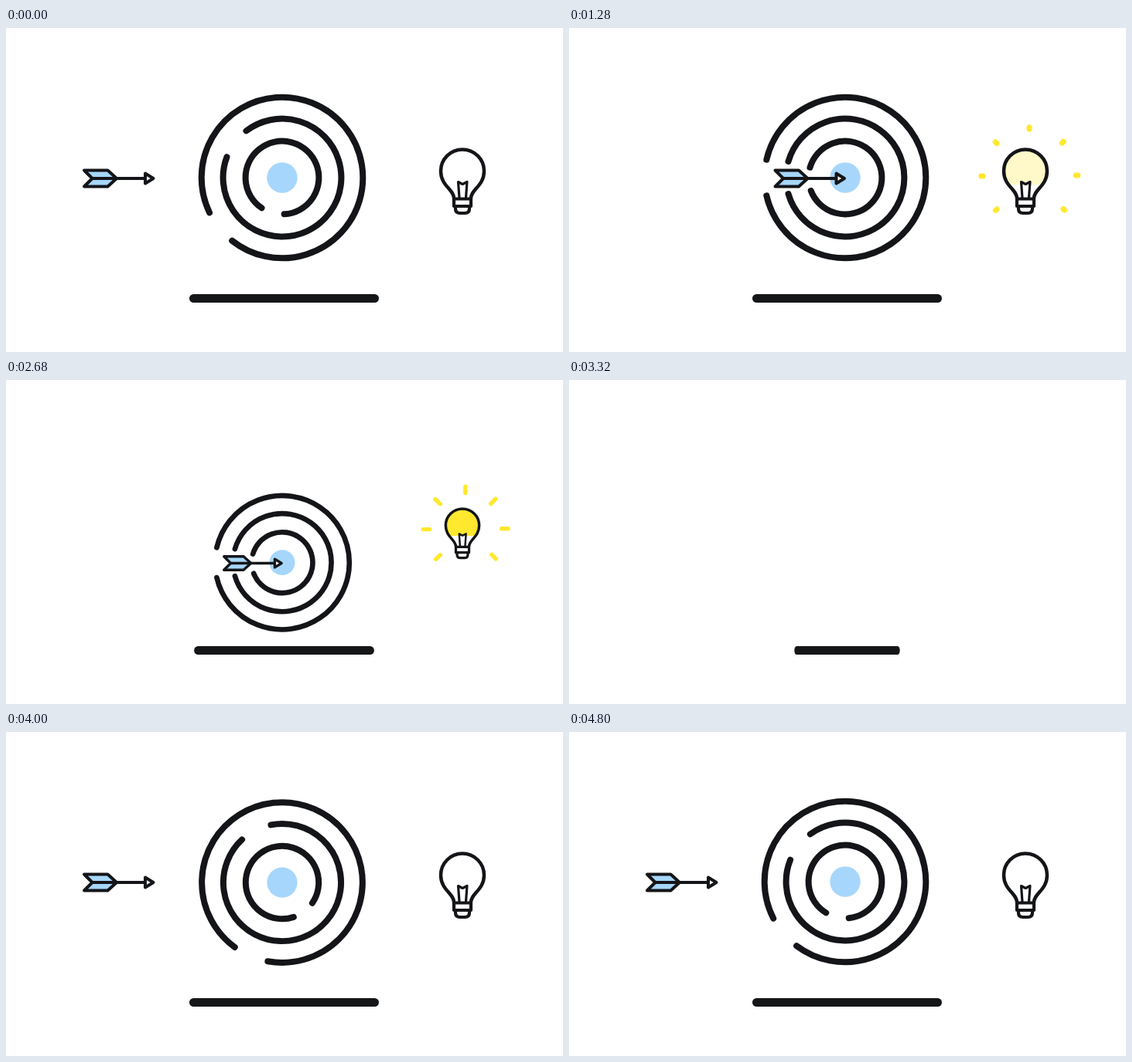
Recreate the animation shown at these times as an HTML page. Size 720 by 420 pixels, loop 4840 ms.

```html
<!DOCTYPE html>
<html lang="en">
<head>
<meta charset="utf-8">
<title>Arrow, target and idea</title>
<style>
html, body { margin: 0; width: 100%; height: 100%; overflow: hidden; background: #fff; }
svg { display: block; width: 100vw; height: 100vh; }
.ink { fill: none; stroke: #141518; stroke-linecap: round; stroke-linejoin: round; }
</style>
</head>
<body>
<svg viewBox="0 0 720 420">
  <rect id="bar" x="237" y="345" width="245" height="11" rx="5.5" fill="#141617"/>
  <g id="target">
    <circle cx="357" cy="194" r="19.7" fill="#a6d6fb"/>
    <g id="rings" class="ink" stroke-width="8"></g>
  </g>
  <g id="arrow" class="ink" stroke-width="4">
    <path d="M101 184.5H131.500L143 195L131.500 205.500H101L111.500 195Z" fill="#a6d6fb"/>
    <path d="M112 195H180"/>
    <path d="M180 188.500L190.500 195L180 201.500Z" fill="#fff"/>
  </g>
  <g id="bulb">
    <g id="rays" stroke="#ffe82e" stroke-width="7" stroke-linecap="round"></g>
    <path id="glow" d="M566.500 203C563 197 562 191 562 185.500A28 28 0 0 1 618 185.500C618 191 617 197 613.500 203Z" fill="#ffe82e"/>
    <g class="ink" stroke-width="4.5">
      <path d="M579 221C579 209 562 205 562 185.500A28 28 0 0 1 618 185.500C618 205 601 209 601 221"/>
      <path d="M586 220L584.500 199.500L590.200 202.500L596 199.500L594.500 220" stroke-width="3.2"/>
      <path d="M579 221.500H601V231H579ZM581 232V234.500Q581 240 587 240H593Q599 240 599 234.500V232" stroke-width="4.2"/>
    </g>
  </g>
</svg>
<script>
const LOOP = 4840, CX = 357, CY = 194;
const $ = id => document.getElementById(id);
const set = (el, name, value) => el.setAttribute(name, value);
const add = (parent, tag) => parent.appendChild(
  document.createElementNS("http://www.w3.org/2000/svg", tag));

// radius, half gap (deg), speed (deg/s), resting angle
const rings = [[104.3, 12.9, 33.4, 0], [76.4, 16, 31.5, 0], [47.4, 18.6, 62.3, -2.4]]
  .map(([r, gap, speed, rest], i) => {
    const el = add($("rings"), "path");
    const a = gap * Math.PI / 180, x = CX - r * Math.cos(a), y = r * Math.sin(a);
    set(el, "d", `M${x} ${CY - y}A${r} ${r} 0 1 1 ${x} ${CY + y}`);
    return { el, speed: i === 1 ? speed : -speed, rest };
  });

// inner end, then outer end
const rays = [[595, 131, 595, 120.5], [553, 149.5, 544.5, 141.5], [637.500, 149, 645.5, 141],
  [535, 192, 524.5, 192], [655.5, 191, 666.5, 191], [553, 235, 545.5, 242], [639, 234.5, 646, 241.5]]
  .map(p => ({ el: add($("rays"), "line"), p }));

const span = (t, start, length) => Math.min(1, Math.max(0, (t - start) / length));
const cubeIn = p => p ** 3;
const cubeOut = p => 1 - (1 - p) ** 3;
const cubeInOut = p => p < 0.5 ? 4 * p ** 3 : 1 - 4 * (1 - p) ** 3;

function pop(t) {
  const u = Math.max(0, t - 3400) * 0.0093;
  return 1 - Math.exp(-1.3 * u) * Math.cos(u);
}

function scaleAt(el, x, y, sx, sy = sx, dy = 0) {
  set(el, "transform", `translate(${x} ${y + dy}) scale(${sx} ${sy}) translate(${-x} ${-y})`);
  set(el, "visibility", sx > 0.002 ? "visible" : "hidden");
}

function draw(t) {
  const entering = t > 3100;
  const turn = Math.min(0, (entering ? t - LOOP : t) - 1160) / 1000;
  for (const { el, speed, rest } of rings)
    set(el, "transform", `rotate(${rest - turn * speed} ${CX} ${CY})`);

  let size, drop;
  if (entering) {
    const p = cubeOut(span(t, 3400, 360));
    const u = Math.max(0, t - 3760) / 1000;
    const bob = 4 * Math.exp(-5.5 * u) * Math.sin(19 * u);
    size = p * (1 + bob * 0.004);
    drop = 60 * (1 - p) - bob;
  } else {
    size = 1 - cubeIn(span(t, 2350, 600));
    drop = 172 * cubeIn(span(t, 2304, 600));
  }
  scaleAt($("target"), CX, CY, size, size, drop);

  if (entering) scaleAt($("arrow"), 145.5, 195, pop(t));
  else {
    const fly = 165.5 * cubeInOut(span(t, 860, 390));
    scaleAt($("arrow"), CX, CY, size, size, drop);
    set($("arrow"), "transform", $("arrow").getAttribute("transform") + ` translate(${fly} 0)`);
  }

  scaleAt($("bulb"), 590, 199, entering ? pop(t) : 1 - cubeIn(span(t, 2315, 600)));
  set($("glow"), "opacity", entering ? 0 : span(t, 1240, 160));
  const reach = entering ? 0 : cubeOut(span(t, 1260, 280));
  set($("rays"), "opacity", reach > 0 ? 1 : 0);
  for (const { el, p: [x1, y1, x2, y2] } of rays) {
    set(el, "x1", x1);
    set(el, "y1", y1);
    set(el, "x2", x1 + (x2 - x1) * reach);
    set(el, "y2", y1 + (y2 - y1) * reach);
  }

  const width = entering ? cubeOut(span(t, 3226, 400)) : 1 - cubeIn(span(t, 2511, 462));
  scaleAt($("bar"), 359.5, 350.5, width, 1);
}

function tick() {
  draw(performance.now() % LOOP);
  requestAnimationFrame(tick);
}
tick();
</script>
</body>
</html>
```
